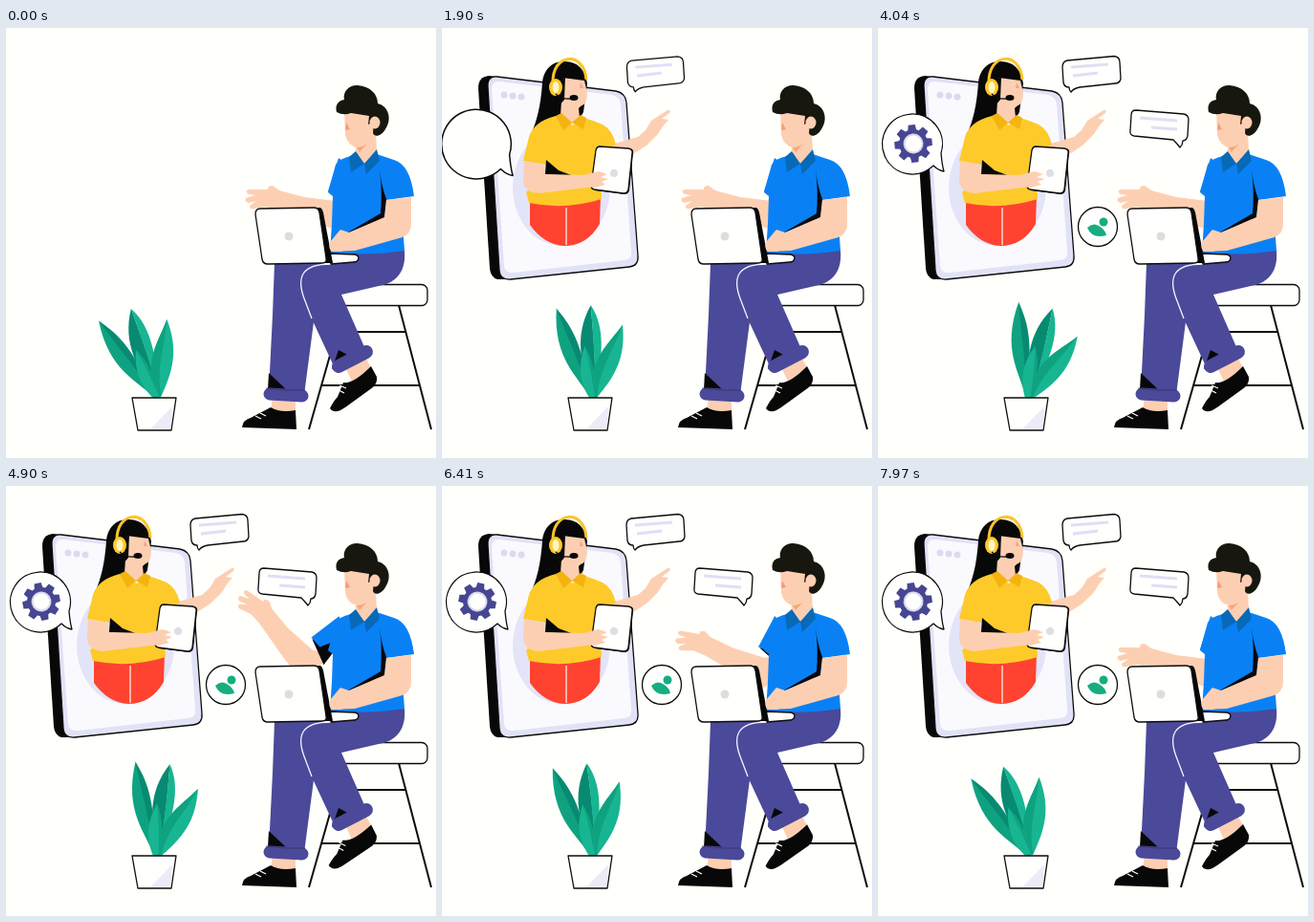
These frames come from a looping animation (450 by 450 pixels, 8000 ms). An HTML page:

```html
<!DOCTYPE html>
<html>
<head>
<meta charset="utf-8">
<style>
html, body { margin: 0; height: 100%; overflow: hidden; background: #fffffb; }
svg { display: block; width: 100vw; height: 100vh; }
.line { stroke: #0c0c0c; stroke-width: 1.3; stroke-linejoin: round; }
.white { fill: #fffffd; }
.skin { fill: #fdcfb2; }
.ink { fill: #080808; }
.blue { fill: #0981f5; }
.pants { fill: #4b4999; }
.yellow { fill: #fdca29; }
.dark { fill: #088a72; }
.mid { fill: #0fa281; }
.light { fill: #17b591; }
.bars { fill: none; stroke: #dfdff5; stroke-width: 3; }
.stroke { fill: none; stroke: #0c0c0c; stroke-width: 2; }
</style>
</head>
<body>
<svg viewBox="0 0 450 450">
  <g id="phone">
    <path class="ink" d="M49 50L60 51L72 263L58 263Q51 261 50 252L38 63Q38 51 49 50Z"/>
    <path class="line" fill="#e1e2f6" d="M58 51L182 66Q192 68 193 78L205 238Q206 249 196 250L72 263Q61 264 60 254L48 62Q47 50 58 51Z"/>
    <path fill="#fafafe" d="M60 56L178 70Q186 72 187 80L198 234Q199 242 191 243L75 256Q66 257 65 249L52 64Q52 55 60 56Z"/>
    <ellipse cx="125" cy="167" rx="51" ry="61" fill="#e3e4f8"/>
    <g fill="#dadaf0"><circle cx="65" cy="70" r="3.5"/><circle cx="74" cy="71" r="3.5"/><circle cx="83" cy="72" r="3.5"/></g>
  </g>

  <g id="woman">
    <path class="ink" d="M105 58C106 43 116 34 129 35C142 35 150 44 152 58L148 88C140 104 128 100 119 104C111 111 102 116 93 112C100 95 103 82 105 58Z"/>
    <path class="skin" d="M170 124L205 114L213 107L219 97L236 86Q240 85 238 89L230 95L237 96L231 103L226 111L214 123L197 134L176 138Z"/>
    <path class="skin" d="M126 52L149 55L152 68Q152 80 145 82L143 84L144 94L136 101L124 92L125 76Z"/>
    <path class="ink" d="M126 47Q140 55 151 52L148 46L135 42ZM122 54L129 51L128 75L122 82Z"/>
    <path d="M145 57L148 63L144 63Z" fill="#f8a47c"/>
    <path fill="#ff4330" d="M92 176L166 176L165 205Q152 228 128 228Q107 227 92 206Z"/>
    <path d="M130 188V227" stroke="#fff0e8" stroke-width="1.3"/>
    <path class="yellow" d="M119 92C103 96 94 104 91 114L85 139L109 143L108 151L88 172L91 183Q129 191 167 179L165 130L182 122Q178 106 168 101Q156 96 146 93L137 102Z"/>
    <path fill="#f4b40f" d="M119 92L125 89L136 99L127 107ZM145 91L151 94L148 106L136 99Z"/>
    <path class="ink" d="M109 138L108 153L138 155L122 149Z"/>
    <path class="skin" d="M86 139L107 143L108 153L151 154L166 150L172 155L170 162L160 166L101 173Q86 172 85 160Z"/>
    <path class="ink" d="M163 125L197 126Q201 127 200 131L196 170Q195 174 191 174L160 170Z"/>
    <path class="line white" d="M165 124L195 126Q200 127 199 131L195 169Q194 173 190 173L159 169Q156 168 156 165L161 128Q162 124 165 124Z"/>
    <path class="skin" d="M148 154L164 150L173 153L166 156L174 158L167 161L171 164L160 167L148 166Z"/>
    <circle cx="180" cy="152" r="4" fill="#dedee4"/>
    <path d="M116 58C115 25 149 24 151 54" fill="none" stroke="#fcc42a" stroke-width="3"/>
    <ellipse cx="119" cy="62" rx="7" ry="9" class="yellow"/>
    <ellipse cx="119" cy="62" rx="3.5" ry="6" fill="#fff5c5"/>
    <path class="stroke" style="stroke-width:1.3" d="M119 69Q125 75 135 74"/>
    <ellipse class="ink" cx="138" cy="73" rx="4.5" ry="3"/>
  </g>

  <g id="chatLeft">
    <path class="line white" d="M198 34L247 29.500Q253 30 253 36L254 53Q253 58 248 58L211 62Q205 63 202 67Q200 65 200 62Q195 62 194 57L193 41Q193 35 198 34Z"/>
    <path class="bars" d="M202 41L241 38M204 50L230 47"/>
  </g>
  <g id="chatRight">
    <path class="line white" d="M270 86L320 90Q325 91 325 96L324 113Q323 118 319 118Q319 122 316 125Q313 121 309 117L268 113Q263 112 264 107L265 91Q265 86 270 86Z"/>
    <path class="bars" d="M274 94L313 97M286 104L313 106"/>
  </g>
  <g id="balloon">
    <path class="line white" d="M66 131Q67 143 69 150Q63 149 58 144A31.5 31.5 0 1 1 66 131Z"/>
  </g>
  <g id="gear">
    <g id="cog">
      <path id="teeth" fill="#474692"/>
      <circle cx="37" cy="121" r="10.5" fill="#d9d9ef"/>
      <circle cx="37" cy="121" r="8.5" class="white"/>
    </g>
  </g>
  <g id="avatar">
    <circle class="line white" cx="230" cy="208" r="20.5"/>
    <circle cx="236" cy="203" r="4.5" fill="#16ad80"/>
    <path d="M219 209Q225 203 231 207Q238 211 239 217Q224 221 219 209Z" fill="#16ad80"/>
  </g>

  <g id="plant">
    <path class="mid" d="M155 387C143 364 117 347 121 293C133 314 146 324 155 387Z"/>
    <path class="dark" d="M155 387C143 344 135 332 121 293C133 308 148 325 155 387Z"/>
    <path class="dark" d="M156 387C147 350 138 324 157 290C159 320 162 350 160 387Z"/>
    <path class="light" d="M157 290C174 316 167 350 160 387C161 350 159 320 157 290Z"/>
    <path class="light" d="M157 387C154 345 175 332 190 311C193 345 182 364 162 387Z"/>
    <path class="mid" d="M157 387C154 345 175 332 190 311C178 343 166 354 162 387Z"/>
    <path class="light" d="M154 387C142 366 144 350 150 333C160 350 160 365 160 387Z"/>
    <path class="mid" d="M150 333C160 350 160 365 160 387C157 365 155 350 150 333Z"/>
  </g>
  <path class="line white" d="M132 387H178L173 421H138Z"/>
  <path d="M174 396L172 420H151Z" fill="#ececf8"/>

  <path class="stroke" d="M354 290L317 420M411 290L445 420M350 318H418M330 374H433"/>
  <rect class="line white" x="335" y="268.500" width="106" height="22" rx="6"/>

  <path class="skin" d="M279 386H303V403L277 402Z"/>
  <path class="ink" d="M247 418Q248 410 256 408L277 397Q287 403 303 400L304 420Z"/>
  <path d="M261 406L267 409M266 403L272 406" stroke="#fff" stroke-width="1.2"/>
  <path class="pants" d="M281 246H330L323 300L312 384L275 380L279 300Z"/>
  <path class="ink" d="M275 361L274 378L294 379Z"/>
  <path d="M276 383L310 385" stroke="#4b4999" stroke-width="13" stroke-linecap="round"/>
  <path d="M272 377Q292 380 313 379" fill="none" stroke="#353268" stroke-width=".8"/>

  <g id="foot">
    <path class="skin" d="M355 355L377 346L385 361L364 374Z"/>
    <path class="ink" d="M339 398Q343 390 347 386L353 371Q363 373 382 354L388 365Q389 371 384 376L355 397Q344 405 339 398Z"/>
    <path d="M348 379L354 382M349 374L356 377" stroke="#fff" stroke-width="1.2"/>
  </g>
  <path class="pants" d="M339 234L417 233C419 254 409 267 390 270L351 279L376 336L344 356L318 300C304 264 306 247 339 247Z"/>
  <path d="M340 247C309 247 304 261 312 283L320 304" fill="none" stroke="#f5f5ff" stroke-width="1.3"/>
  <path class="ink" d="M348 337L341 357L363 345Z"/>
  <path d="M348 354L377 339" stroke="#4b4999" stroke-width="14" stroke-linecap="round"/>

  <g id="arm">
    <path class="skin" d="M345 181L312 177L286 170L279 165Q273 165 274 169L254 169Q249 171 254 174L261 175L251 178Q249 182 254 183L262 181L255 186Q255 190 260 189L271 187L284 190L328 206L350 212Q364 200 362 176Z"/>
    <path class="ink" d="M348 158L339 172L364 187L365 157Z"/>
    <path class="blue" d="M348 136L337 171L350 174L366 150Z"/>
  </g>
  <path class="blue" d="M361 134Q348 137 345 143L337 172L342 176L341 205L339 235Q380 239 417 233L415 205L398 180L427 176Q423 143 406 138L388 132Z"/>
  <path class="ink" d="M391 148Q393 166 398 179L396 199L356 215L392 194Q394 171 391 148Z"/>
  <path class="skin" d="M398 180L424 177L424 205Q424 215 415 219L365 233L341 234Q336 229 341 224L350 211L359 214L396 198Z"/>
  <path class="skin" d="M365 112L387 110L388 130L375 142L366 131Z"/>
  <path fill="#0869b7" d="M366 129L359 135L361 151L375 142ZM388 127L391 139L377 153L375 142Z"/>
  <path class="skin" d="M354 84L355 112Q358 124 368 125Q380 123 386 111L388 84Z"/>
  <path fill="#17170f" d="M346 88C344 80 348 76 354 75C352 66 360 59 368 60C381 61 389 69 389 79C401 82 404 96 397 106C393 113 386 115 384 110L385 98L379 101L380 92L361 89Q353 92 346 88Z"/>
  <ellipse class="skin" cx="386" cy="99" rx="5.5" ry="6.5"/>
  <path d="M356 99L360 106L355 107Z" fill="#f79c72"/>
  <path d="M367 125Q373 125 378 121L370 130Z" fill="#f4a878"/>

  <path class="line white" d="M339 236L365 237Q369 238 369 241Q368 245 364 245L340 247Z"/>
  <path class="ink" d="M322 188L329 188Q331 189 332 193L342 246H330Z"/>
  <path class="line white" d="M266 189L322 188Q327 188 328 193L335 241Q336 246 331 246L274 247Q269 247 268 242L261 195Q261 189 266 189Z"/>
  <circle cx="296" cy="218" r="4.500" fill="#deded8"/>
  <path class="skin" d="M339 224L349 212L358 215L352 222L357 230L351 234L341 234Q337 230 339 224Z"/>
</svg>
<script>
const $ = id => document.getElementById(id);
const LOOP = 8000;

// id, start time, scaling centre
const pops = [
  ['phone', 30, 125, 157],
  ['woman', 595, 128, 228],
  ['chatLeft', 1115, 223, 48],
  ['balloon', 1640, 36, 121],
  ['gear', 2160, 37, 121],
  ['chatRight', 2680, 295, 104],
  ['avatar', 2680, 230, 208]
];

function spring(ms) {
  const u = ms / 1000;
  return u <= 0 ? 0 : 1 - Math.exp(-5.2 * u) * Math.cos(2.7 * Math.PI * u);
}

const smooth = x => x * x * (3 - 2 * x);

function turn(id, angle, x, y) {
  $(id).setAttribute('transform', `rotate(${angle} ${x} ${y})`);
}

function cogPath(x, y) {
  const points = [];
  for (let i = 0; i < 8; i++) {
    for (const [offset, r] of [[-.3, 15], [-.18, 20], [.18, 20], [.3, 15]]) {
      const a = i * Math.PI / 4 + offset;
      points.push(`${x + r * Math.cos(a)} ${y + r * Math.sin(a)}`);
    }
  }
  return `M${points.join('L')}Z`;
}

$('teeth').setAttribute('d', cogPath(37, 121));

const start = performance.now();
function draw() {
  const t = (performance.now() - start) % LOOP;
  for (const [id, from, x, y] of pops) {
    const s = spring(t - from);
    $(id).setAttribute('visibility', s ? 'visible' : 'hidden');
    $(id).setAttribute('transform', `translate(${x} ${y}) scale(${s}) translate(${-x} ${-y})`);
  }
  // one wave every two seconds, resting briefly at both ends
  const wave = smooth((1 - Math.cos(t * Math.PI / 1000)) / 2);
  turn('arm', 35 * wave, 348, 137);
  turn('foot', 2 * wave, 368, 360);
  turn('plant', 16 - 32 * Math.abs(1 - t / 4000), 157, 385);
  turn('cog', (t - 2160) * .045, 37, 121);
  requestAnimationFrame(draw);
}
draw();
</script>
</body>
</html>
```
